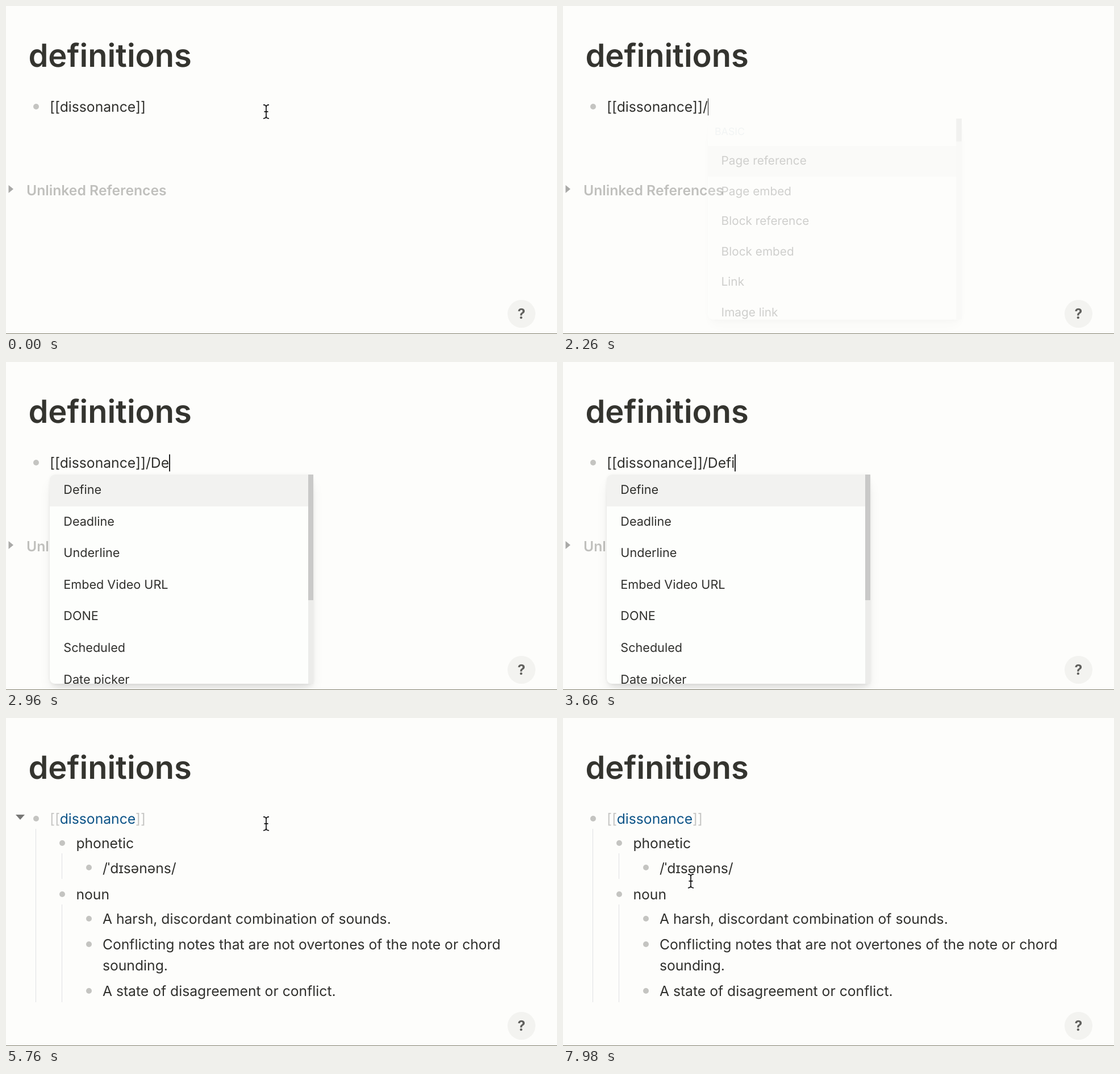
Animation, 970 px wide and 577 px high, one loop 8 s. Source, as an HTML page:

```html
<!DOCTYPE html>
<html lang="en">
<head>
<meta charset="utf-8">
<title>definitions</title>
<style>
  html, body { margin: 0; width: 100%; height: 100%; overflow: hidden; }
  body {
    position: relative; background: #fdfdfb; color: #30302d;
    font: 24.71px/37px Inter, sans-serif; font-optical-sizing: none;
    text-rendering: geometricPrecision; -webkit-font-smoothing: antialiased;
  }
  body * { position: absolute; white-space: pre; }
  span { position: static; }
  .line { transform: translateY(-50%); }
  .title { font-size: 56px; line-height: 70px; font-weight: 600; color: #34342f; }
  .muted { font-weight: 600; color: #c0c0bd; }
  .bracket { color: #c6c6c4; }
  .link { color: #0d5488; }
  .bullet { width: 10px; height: 10px; margin: -5px; border-radius: 50%; background: #c4c4c1; }
  .guide { width: 1px; background: #e0e1e4; }
  .caret { display: inline-block; width: 1.5px; height: 30px; top: 3.5px; background: #222; }
  .help {
    left: 883px; top: 517px; width: 49px; height: 49px; border-radius: 50%;
    background: #f3f3f0; color: #60605d; font-weight: 700; line-height: 49px; text-align: center;
  }
  .footer { left: 0; top: 576px; width: 100%; height: 1px; background: #807e6c; }
  .menu {
    top: 198px; width: 464.5px; height: 368px; border-radius: 9px 0 0 9px;
    background: #fdfefc; transform-origin: top center; font-size: 21.62px;
    box-shadow: 0 15px 23px -5px rgba(0,0,0,.1), 0 6px 9px -3px rgba(0,0,0,.06), 0 0 6px rgba(0,0,0,.04);
  }
  .list { inset: 0; overflow: hidden; border-radius: inherit; }
  .group, .item { position: relative; }
  .group { height: 50px; line-height: 48px; padding-left: 12.4px; font-size: 18.53px; color: #cdd9de; }
  .item { height: 55.6px; line-height: 55.6px; padding-left: 24.5px; }
  .item.chosen { background: #f2f2f0; }
  .track { right: 0; top: 0; width: 9.5px; height: 100%; background: #ececea; }
  .thumb { width: 100%; background: #c9c9c8; }
  svg { left: 0; top: 0; overflow: visible; }
</style>
</head>
<body>
<script>
const LOOP = 8000;
const KEYS = [[47, "/"], [53, "/D"], [59, "/De"], [65, "/Def"], [71, "/Defi"], [107, ""]];
const SLASH = 47, MOVE_MENU = 53, FILTER = 55, CLOSE = 107, INSERT = 118;
const MOVE_START = 160, MOVE_END = 169, BLINK = 11;

const BASIC = ["Page reference", "Page embed", "Block reference", "Block embed", "Link", "Image link"];
const MATCHES = ["Define", "Deadline", "Underline", "Embed Video URL", "DONE", "Scheduled", "Date picker"];
const TEXT_LEFT = 76.9, INDENT = 46.5;

function add(parent, className, style = {}, html = "") {
  const node = document.createElement("div");
  node.className = className;
  for (const key in style) node.style[key] = style[key] + "px";
  node.innerHTML = html;
  parent.append(node);
  return node;
}
const line = (parent, left, top, html, kind = "") => add(parent, "line " + kind, { left, top }, html);
const shape = (parent, paths) =>
  add(parent, "", { left: 0, top: 0 }, `<svg width="1" height="1">${paths}</svg>`);
const show = (node, on) => { node.style.display = on ? "" : "none"; };

function block(parent, level, y, html) {
  add(parent, "bullet", { left: 52.5 + level * INDENT, top: y - 0.5 });
  line(parent, TEXT_LEFT + level * INDENT, y, html);
}

const page = document.body;
line(page, 39.4, 87, "definitions", "title");
add(page, "bullet", { left: 52.5, top: 176.5 });

const editor = line(page, TEXT_LEFT, 177, '[[dissonance]]<span></span><div class="caret"></div>');
const typed = editor.querySelector("span");
const caret = editor.querySelector(".caret");

const references = add(page, "");
line(references, 36, 324, "Unlinked References", "muted");
shape(references, '<path d="M4.5 315V329L13 322Z" fill="#a9a9a7"/>');

const result = add(page, "");
line(result, TEXT_LEFT, 177,
  '<span class="bracket">[[</span><span class="link">dissonance</span><span class="bracket">]]</span>');
for (const [left, top, bottom] of [[51.5, 195, 500], [98, 238, 283], [98, 328, 500]])
  add(result, "guide", { left, top, height: bottom - top });
block(result, 1, 220, "phonetic");
block(result, 2, 263.5, "/ˈdɪsənəns/");
block(result, 1, 310.3, "noun");
block(result, 2, 353.3, "A harsh, discordant combination of sounds.");
block(result, 2, 398, "Conflicting notes that are not overtones of the note or chord");
line(result, TEXT_LEFT + 2 * INDENT, 435.3, "sounding.");
block(result, 2, 480.3, "A state of disagreement or conflict.");
const toggle = shape(result, '<path d="M17 170H33L25 179Z" fill="#777775"/>');

add(page, "help", {}, "?");
add(page, "footer");

const menu = add(page, "menu");
function addList(items, header, thumbHeight) {
  const list = add(menu, "list");
  if (header) add(list, "group", {}, header);
  items.forEach((name, i) => add(list, i ? "item" : "item chosen", {}, name));
  add(add(list, "track"), "thumb", { height: thumbHeight });
  return list;
}
const basicList = addList(BASIC, "BASIC", 42);
const matchList = addList(MATCHES, "", 221);

const beam = "M-5-12Q0-12 0-8V8Q0 12-5 12M5-12Q0-12 0-8M5 12Q0 12 0 8M-3.5 0H3.5";
const pointer = shape(page, `<g fill="none"><path d="${beam}" stroke="#fff" stroke-width="4"/>
  <path d="${beam}" stroke="#111" stroke-width="1.7"/></g>`);

function stepAt(time) {
  const group = Math.floor((time - 20) / 140);
  const rest = time - 20 - group * 140;
  return group * 3 + (rest < 100 ? 0 : rest < 120 ? 1 : 2);
}

function render(time) {
  const step = stepAt(time);
  let lastKey = 6, text = "";
  for (const [at, value] of KEYS) if (step >= at) [lastKey, text] = [at, value];

  const inserted = step >= INSERT;
  show(editor, !inserted);
  show(references, !inserted);
  show(result, inserted);
  typed.textContent = text;
  caret.style.opacity = Math.floor((step - lastKey) / BLINK) % 2 === 0 ? 1 : 0;

  const fade = Math.min(1, 0.22 + 0.47 * (step - SLASH - 1));
  show(menu, step > SLASH && step < CLOSE);
  menu.style.left = (step < MOVE_MENU ? 245.5 : 76.8) + "px";
  menu.style.opacity = fade;
  menu.style.transform = `scale(${0.95 + 0.05 * fade})`;
  show(basicList, step < FILTER);
  show(matchList, step >= FILTER);

  const progress = Math.min(1, Math.max(0, (step - MOVE_START) / (MOVE_END - MOVE_START)));
  const eased = progress * progress * (3 - 2 * progress);
  const y = 185.8 + 101 * eased;
  show(pointer, step < SLASH || inserted);
  pointer.style.transform = `translate(${458 - 233 * eased}px, ${y}px)`;
  show(toggle, y < 200);
}

const start = performance.now();
function tick() {
  render((performance.now() - start) % LOOP);
  requestAnimationFrame(tick);
}
tick();
</script>
</body>
</html>
```
